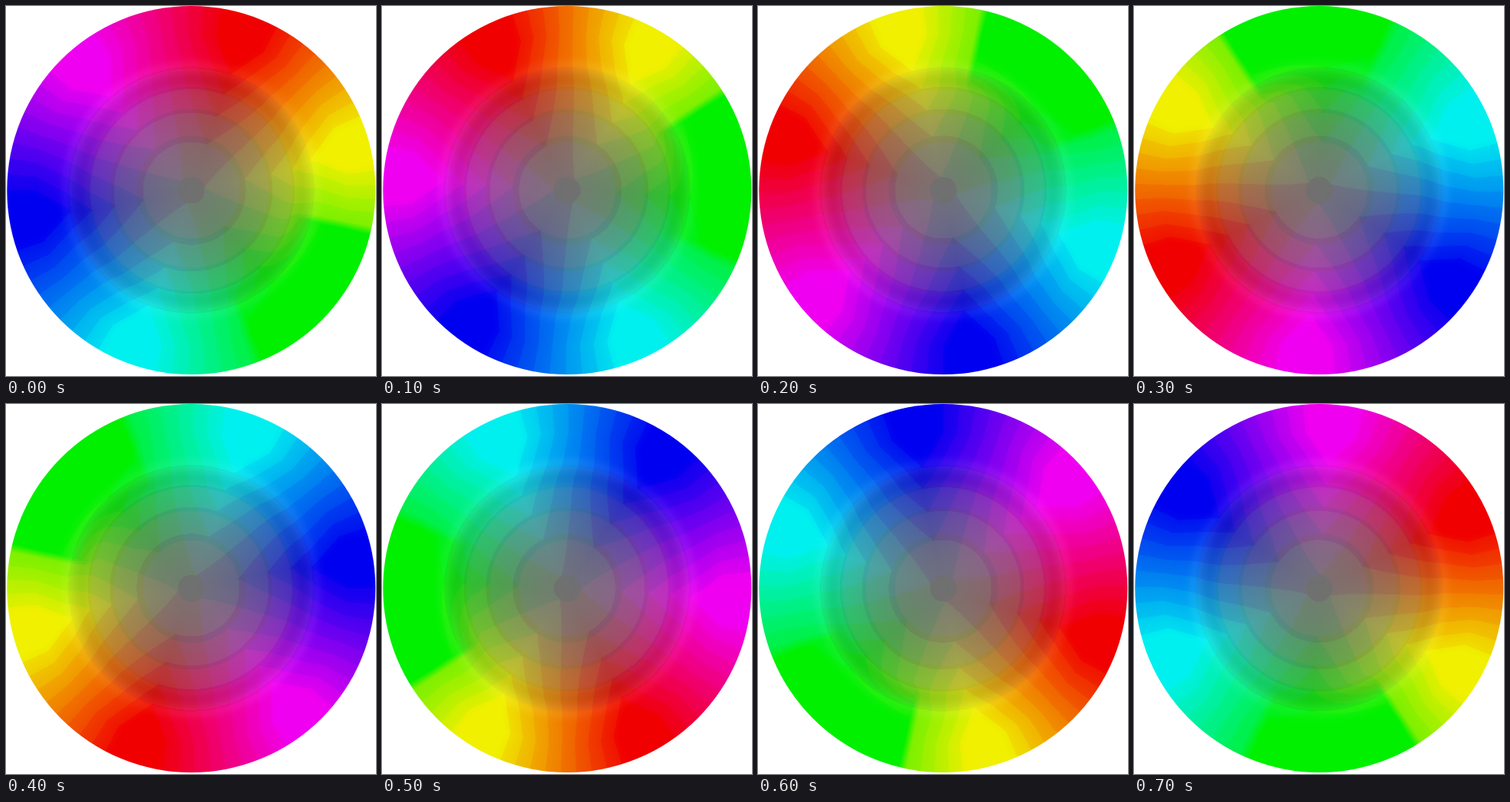
These frames come from a looping animation (480x480 px, 0.8 s). An HTML page with a canvas:

```html
<!DOCTYPE html>
<html lang="en">
<head>
<meta charset="utf-8">
<title>Colour wheel</title>
<style>
html, body { margin: 0; width: 100%; height: 100%; overflow: hidden; background: #fff; }
canvas { display: block; width: 100vw; height: 100vh; }
</style>
</head>
<body>
<canvas id="stage" width="480" height="480"></canvas>
<script>
const SIZE = 480, MID = SIZE / 2, RADIUS = 239;
const STEPS = 8, STEP_MS = 100, RED_ANGLE = 18.5;
const GREY = 0.49, PEAK = 0.942, LEVELS = 9;

// Rim hues: [angle from red, hue]; green covers a wide sector.
const HUES = [[0, 0], [57, 60], [83, 90], [86, 116], [120, 120], [138, 126],
  [142, 140], [182, 180], [242, 240], [301, 300], [360, 360]];

const clamp = v => Math.min(1, Math.max(0, v));
const mix = (a, b, t) => a + (b - a) * t;
const bump = (r, at, width) => Math.exp(-(((r - at) / width) ** 2));

function smooth(a, b, v) {
  const t = clamp((v - a) / (b - a));
  return t * t * (3 - 2 * t);
}

function rimHue(angle) {
  let i = 1;
  while (HUES[i][0] < angle) i++;
  const [a0, h0] = HUES[i - 1], [a1, h1] = HUES[i];
  return mix(h0, h1, (angle - a0) / (a1 - a0));
}

function pureChannel(hue, centre) {
  const gap = Math.abs(hue - centre) % 360;
  return clamp(2 - Math.min(gap, 360 - gap) / 60);
}

// Contrast with flat ends, then softened colour bands.
function tone(v) {
  const c = clamp((v - 0.12) / 0.76);
  return mix(c, Math.round(c * LEVELS) / LEVELS, 0.5);
}

function makeWheel() {
  const wheel = document.createElement('canvas');
  wheel.width = wheel.height = SIZE;
  const ctx = wheel.getContext('2d');
  const image = ctx.createImageData(SIZE, SIZE);
  const px = image.data;
  for (let y = 0, p = 0; y < SIZE; y++) {
    for (let x = 0; x < SIZE; x++, p += 4) {
      const dx = x + 0.5 - MID, dy = y + 0.5 - MID;
      const r = Math.hypot(dx, dy);
      const turn = Math.atan2(dx, -dy) * 180 / Math.PI;
      const angle = (turn - RED_ANGLE + 720) % 360;
      const sat = Math.min(1, 1.3 * Math.pow(r / RADIUS, 1.6));
      const hue = mix(angle, rimHue(angle), smooth(0.45, 0.75, sat));
      const ring = 0.04 * bump(r, 163, 8) - 0.03 * bump(r, 143, 9);
      for (let k = 0; k < 3; k++) {
        const v = mix(GREY, pureChannel(hue, k * 120), sat);
        px[p + k] = 255 * Math.min(PEAK, clamp(tone(v) * PEAK + ring));
      }
      px[p + 3] = 255;
    }
  }
  ctx.putImageData(image, 0, 0);
  return wheel;
}

const ctx = document.getElementById('stage').getContext('2d');
const wheel = makeWheel();
const start = performance.now();

function draw() {
  const step = Math.floor((performance.now() - start) / STEP_MS) % STEPS;
  ctx.fillStyle = '#fff';
  ctx.fillRect(0, 0, SIZE, SIZE);
  ctx.save();
  ctx.translate(240.3, 239);
  ctx.beginPath();
  ctx.arc(0, 0, RADIUS, 0, Math.PI * 2);
  ctx.clip();
  ctx.rotate(-step * Math.PI * 2 / STEPS);
  ctx.drawImage(wheel, -MID, -MID);
  ctx.restore();
  requestAnimationFrame(draw);
}
draw();
</script>
</body>
</html>
```
